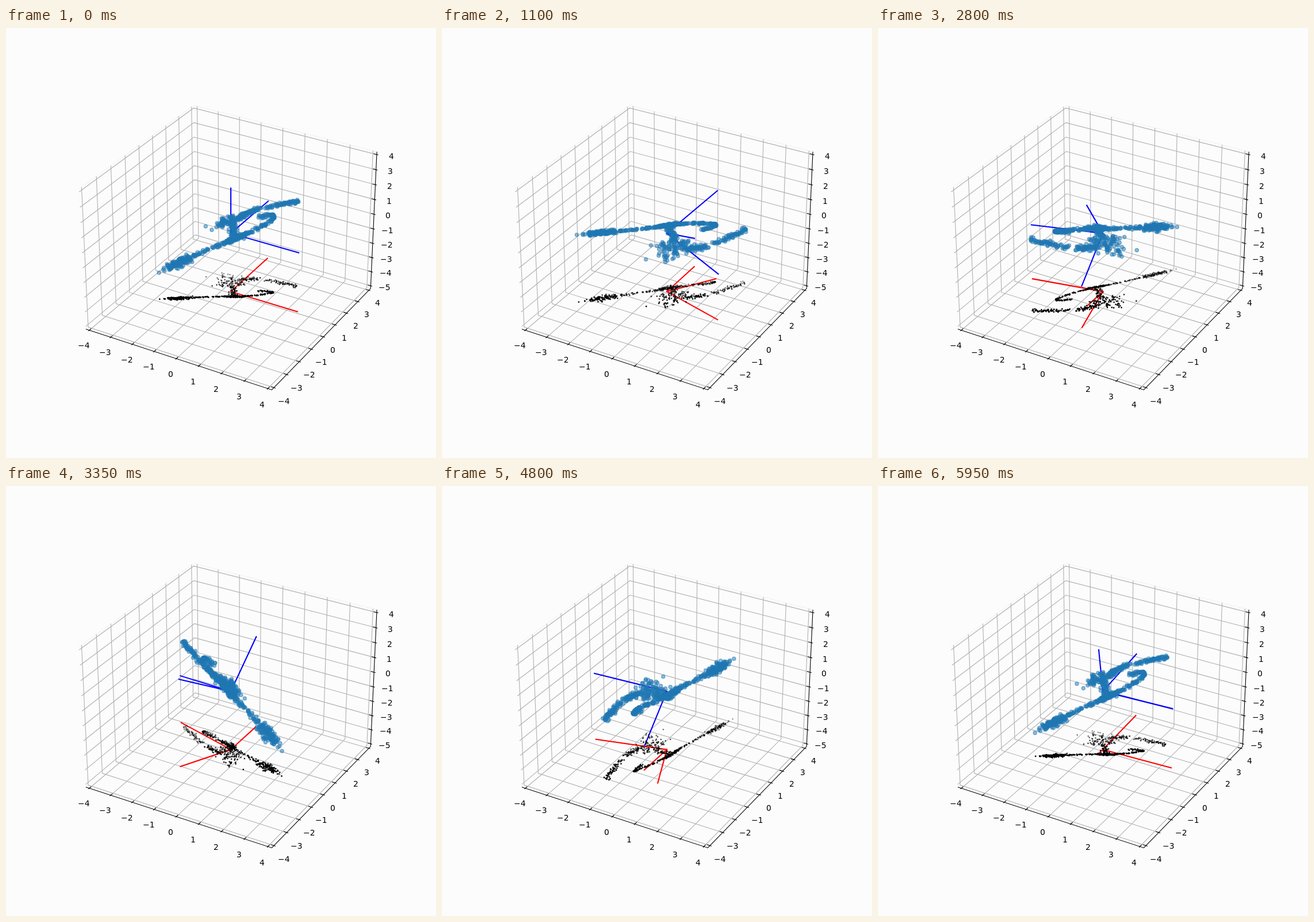
An HTML page with a canvas that plays this animation: 748 px wide and 748 px high, repeating every 6000 ms.

```html
<!DOCTYPE html>
<html lang="en">
<head>
<meta charset="utf-8">
<title>Rotating point cloud</title>
<style>
  html, body { margin: 0; width: 100%; height: 100%; overflow: hidden; background: #fcfcfc; }
  canvas { display: block; width: 748px; height: 748px; }
</style>
</head>
<body>
<canvas id="stage" width="748" height="748"></canvas>
<script>
const ctx = document.getElementById('stage').getContext('2d');
const SIZE = 748, LOOP = 6000, STEP = 50, PT = 100 / 72;
const FLOOR = -4, AXIS_LEN = 3;
const C = Math.sqrt(3) / 2;

// Perspective camera: elevation 30 degrees, azimuth -60 degrees, distance 10
function project([x, y, z]) {
  const X = x / 7, Y = y / 7, Z = (z + 0.5) * 2 / 21;
  const depth = 10 - (C * X / 2 - 0.75 * Y + Z / 2);
  const k = 3113.3 / depth;
  return [391.1 + k * (C * X + Y / 2),
          370 - k * (-X / 4 + C * Y / 2 + C * Z), depth];
}

function path(g, points, color, width) {
  g.beginPath();
  for (const p of points) {
    const [x, y] = project(p);
    g.lineTo(x, y);
  }
  g.strokeStyle = color;
  g.lineWidth = width;
  g.stroke();
}

// Static plot box, drawn once
function makeBox() {
  const layer = document.createElement('canvas');
  layer.width = layer.height = SIZE;
  const g = layer.getContext('2d');
  g.fillStyle = '#fcfcfc';
  g.fillRect(0, 0, SIZE, SIZE);
  g.font = 10 * PT + 'px "DejaVu Sans", sans-serif';

  const H = 4 + 1 / 6, B = -5.1875, T = 4.1875;
  const grid = points => path(g, points, '#b0b0b0', 0.8 * PT);
  const ink = points => path(g, points, '#000', 0.8 * PT);
  const label = (p, v) => {
    const [x, y] = project(p);
    const text = v < 0 ? '\u2212' + -v : String(v);
    g.fillStyle = '#000';
    g.fillText(text, Math.round(x - g.measureText(text).width / 2), Math.round(y + 10.6));
  };

  path(g, [[-H, -H, T], [-H, H, T], [H, H, T]], '#f1f1f1', 1);
  for (let v = -4; v <= 4; v++) {
    grid([[v, -H, B], [v, H, B], [v, H, T]]);
    grid([[H, v, B], [-H, v, B], [-H, v, T]]);
  }
  for (let v = -5; v <= 4; v++) grid([[-H, -H, v], [-H, H, v], [H, H, v]]);

  ink([[-H, -H, B], [H, -H, B], [H, H, B], [H, H, T]]);
  const inner = H - 0.133, outer = H + 0.067, text = H + 0.422, low = B - 0.475;
  for (let v = -4; v <= 4; v++) {
    ink([[v, -inner, B], [v, -outer, B]]);
    label([v, -text, low], v);
    ink([[inner, v, B], [outer, v, B]]);
    label([text, v, low], v);
  }
  for (let v = -5; v <= 4; v++) {
    ink([[inner, H, v], [outer, H, v]]);
    label([text, text, v], v);
  }
  return layer;
}

let seed = 20731;
function rand() {
  seed = (seed + 0x6D2B79F5) | 0;
  let t = Math.imul(seed ^ (seed >>> 15), 1 | seed);
  t = (t + Math.imul(t ^ (t >>> 7), 61 | t)) ^ t;
  return ((t ^ (t >>> 14)) >>> 0) / 4294967296;
}
// Bell-shaped noise, unit deviation, bounded at 3
const bell = () => (rand() + rand() + rand() - 1.5) * 2;

const cloud = [];

// First leaf: a ribbon along a smooth curve, from the tail to the hook
const KEYS = [
  [-2.15, -1.9, -2.18], [-1.2, -1.24, -1.28], [-0.12, -0.5, -0.4],
  [0.6, -0.09, 0.2], [1.35, 0.59, 0.88], [1.43, 0.79, 1.27], [0.9, 0.59, 1]
];
const SIDE = [0.41, 0.45, -0.79], NORMAL = [0.62, -0.77, -0.12];

function curve(u) {
  const i = Math.min(Math.floor(u), KEYS.length - 2), f = u - i;
  const key = k => KEYS[Math.max(0, Math.min(KEYS.length - 1, k))];
  const [a, b, c, d] = [key(i - 1), key(i), key(i + 1), key(i + 2)];
  return b.map((p, j) => p + f / 2 * (c[j] - a[j]
    + f * (2 * a[j] - 5 * p + 4 * c[j] - d[j] + f * (3 * (p - c[j]) + d[j] - a[j]))));
}

function ribbon(n, from, to, width) {
  for (let i = 0; i < n; i++) {
    const side = bell() * width, lift = bell() * width * 0.35;
    const p = curve(from + (to - from) * rand());
    cloud.push(p.map((c, j) => c + SIDE[j] * side + NORMAL[j] * lift));
  }
}

// Second leaf: a nearly flat sheet above (x, y)
function sheet(x, y) {
  const lift = bell() * 0.04;
  cloud.push([x + 0.56 * lift, y, 0.5 + 0.68 * x - 0.03 * x * x - 0.83 * lift]);
}

function arm(n, from, to) {
  for (let i = 0; i < n; i++) {
    const x = from + (to - from) * rand();
    sheet(x, 1.7 - 0.63 * Math.exp(-1.35 * x) + bell() * 0.075);
  }
}

function makeCloud() {
  ribbon(1, 0, 0, 0);
  ribbon(6, 0.2, 0.45, 0.12);
  ribbon(110, 0.42, 1.05, 0.15);
  ribbon(70, 1, 2.5, 0.05);
  ribbon(80, 2.25, 3.05, 0.09);
  ribbon(85, 3, 5, 0.05);
  ribbon(25, 5, 6, 0.07);

  sheet(-1.41, 0.48);
  for (let i = 0; i < 95; i++) sheet(-0.35 + bell() * 0.28, 0.65 + bell() * 0.27);
  for (let i = 0; i < 45; i++) {
    const f = rand();
    cloud.push([0.3 - 0.4 * f, -0.2 + 0.5 * f, 0.15 + 0.25 * f].map(c => c + bell() * 0.08));
  }
  arm(55, -0.2, 0.58);
  arm(62, 0.75, 2.13);
}

// One turn about z, then two turns about x, per loop
function rotator(angle) {
  const c = Math.cos(angle), s = Math.sin(angle);
  const c2 = Math.cos(2 * angle), s2 = Math.sin(2 * angle);
  return ([x, y, z]) => {
    const px = c * x + s * y, py = c * y - s * x;
    return [px, c2 * py + s2 * z, c2 * z - s2 * py];
  };
}

const onFloor = ([x, y]) => [x, y, FLOOR];

function dot([x, y], r, width) {
  ctx.beginPath();
  ctx.arc(x, y, r, 0, 2 * Math.PI);
  ctx.fill();
  ctx.lineWidth = width;
  ctx.stroke();
}

function setColor(color) {
  ctx.fillStyle = ctx.strokeStyle = color;
}

function draw(now) {
  const step = Math.floor((now % LOOP) / STEP);
  const turn = rotator(2 * Math.PI * step * STEP / LOOP);
  ctx.globalAlpha = 1;
  ctx.drawImage(box, 0, 0);

  const ends = [[AXIS_LEN, 0, 0], [0, AXIS_LEN, 0], [0, 0, AXIS_LEN]].map(turn);
  ctx.lineCap = 'square';
  for (const e of ends) path(ctx, [[0, 0, 0], e], '#0000ff', 1.5 * PT);
  for (const e of ends) path(ctx, [[0, 0, FLOOR], onFloor(e)], '#ff0000', 1.5 * PT);

  const spots = cloud.map(turn);

  // Floor shadow, fading with distance
  const shadow = spots.map(p => project(onFloor(p))).sort((a, b) => b[2] - a[2]);
  const far = shadow[0][2], near = shadow[shadow.length - 1][2];
  setColor('#000');
  for (const p of shadow) {
    ctx.globalAlpha = 1 - 0.7 * (p[2] - near) / (far - near);
    dot(p, PT / 2, PT);
  }

  setColor('#1f77b4');
  ctx.globalAlpha = 0.5;
  for (const p of spots) dot(project(p), Math.sqrt(20) * PT / 2, PT);
}

const box = makeBox();
makeCloud();
const start = performance.now();
function tick() {
  draw(performance.now() - start);
  requestAnimationFrame(tick);
}
tick();
</script>
</body>
</html>
```
